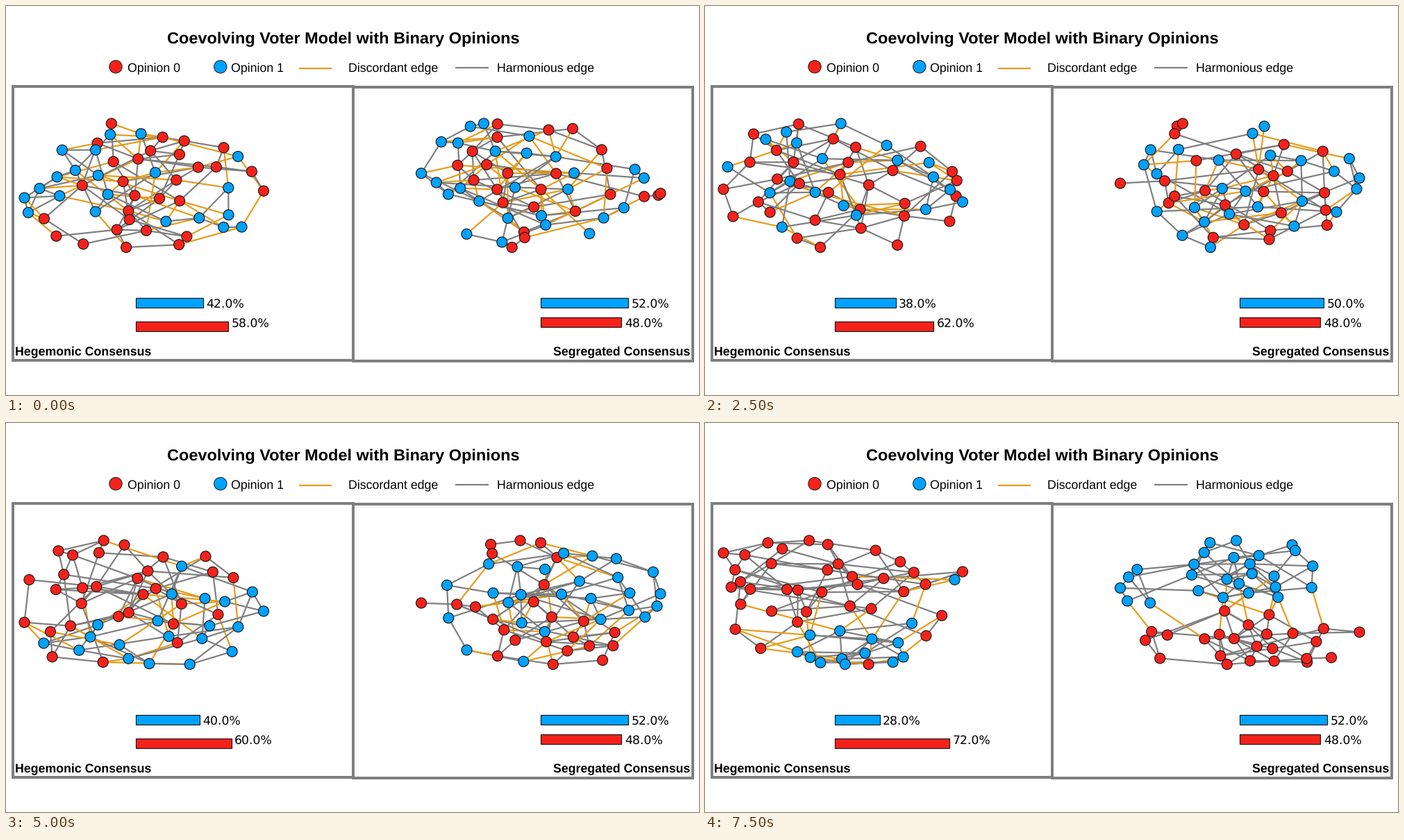
Animation of 998x561 px, one loop 8000 ms. Source, as a matplotlib script:

```python
import numpy as np
import matplotlib.pyplot as plt
from matplotlib.animation import FuncAnimation
from matplotlib.collections import LineCollection
from matplotlib.patches import Circle, Rectangle

W, H, DPI = 998, 561, 100
PT = 72 / DPI
N, EDGES, STEPS = 50, 110, 16
TOP, BOTTOM = 169.5, 348
RED, BLUE = "#f5221b", "#00a2ff"
ORANGE, GRAY, INK = "#e69c1c", "#7f7f7f", "#1c1c1c"

plt.rcParams["text.hinting"] = "none"
fig = plt.figure(figsize=(W / DPI, H / DPI), dpi=DPI, facecolor="white")
ax = fig.add_axes([0, 0, 1, 1])
ax.set(xlim=(0, W), ylim=(H, 0))
ax.axis("off")


def label(x, y, text, px, font="Liberation Sans", **kw):
    return ax.text(x, y, text, fontsize=px * PT, family=font, color="black",
                   va="baseline", **kw)


def trend(*keys):
    """Value at every step, linear between (step, value) keys."""
    return np.interp(np.arange(STEPS), *zip(*keys))


def even(values):
    return 2 * np.round(values / 2).astype(int)


def random_graph(rng):
    """A closed ring through all voters plus random shortcuts."""
    ring = rng.permutation(N).tolist()
    links = {tuple(sorted(p)) for p in zip(ring, ring[1:] + ring[:1])}
    while len(links) < EDGES:
        a, b = sorted(rng.integers(N, size=2).tolist())
        if a != b:
            links.add((a, b))
    return sorted(links)


def rewire(edges, blue, goal, rng):
    """Replace discordant edges by like-minded ones until `goal` remain."""
    edges = list(edges)
    while True:
        bad = [i for i, (a, b) in enumerate(edges) if blue[a] != blue[b]]
        if len(bad) <= goal:
            return edges
        i = bad[rng.integers(len(bad))]
        a, b = edges[i] if rng.random() < 0.5 else edges[i][::-1]
        if sum(b in e for e in edges) == 1:
            a, b = b, a
        c = int(rng.choice(np.flatnonzero(blue == blue[a])))
        new = (min(a, c), max(a, c))
        if a != c and new not in edges:
            edges[i] = new


def spring_layout(edges, rng, rounds=60):
    """Fruchterman-Reingold with a weak pull to the middle."""
    adj = np.zeros((N, N))
    for a, b in edges:
        adj[a, b] = adj[b, a] = 1
    k = 1 / np.sqrt(N)
    pos = rng.random((N, 2)) - 0.5
    for heat in np.linspace(0.1, 0.002, rounds):
        gap = pos[:, None] - pos[None]
        dist = np.maximum(np.hypot(gap[..., 0], gap[..., 1]), 0.01)
        pull = k * k / dist**2 - adj * dist / k
        move = (gap * pull[..., None]).sum(1) - 0.8 * pos
        size = np.maximum(np.hypot(*move.T), 0.01)
        pos += move * (heat / size)[:, None]
    return pos - pos.mean(0)


def fill_disc(pos):
    """Spread the radii evenly so the layout has a round outline."""
    r = np.hypot(*pos.T)
    rank = r.argsort().argsort()
    return pos * (((rank + 1) / N) ** 0.55 / r)[:, None]


def orient(pos, blue, degrees):
    """Turn the layout so the blue side faces the given direction."""
    dx, dy = pos[blue].mean(0) - pos[~blue].mean(0)
    t = np.radians(degrees) - np.arctan2(dy, dx)
    c, s = np.cos(t), np.sin(t)
    return pos @ np.array([[c, s], [-s, c]])


def fit(pos, left, right):
    unit = (pos - pos.min(0)) / np.ptp(pos, axis=0)
    return np.column_stack([left + unit[:, 0] * (right - left),
                            BOTTOM - unit[:, 1] * (BOTTOM - TOP)])


class Network:
    """One voter network with its two opinion bars."""

    def __init__(self, seed, blue_share, red_share, discord, facing, span,
                 bar_x, scale, red_y, pad):
        rng = np.random.default_rng(seed)
        rank = rng.permutation(N)
        edges = random_graph(rng)
        self.steps = []
        for share, part, angle in zip(blue_share, discord, facing):
            blue = rank < share // 2
            edges = rewire(edges, blue, part * EDGES, rng)
            pos = fill_disc(spring_layout(edges, rng))
            self.steps.append((fit(orient(pos, blue, angle), *span), blue, edges))

        self.shares = list(zip(blue_share, red_share))
        self.x, self.scale, self.pad = bar_x, scale, pad
        self.lines = ax.add_collection(
            LineCollection([], linewidths=2.2 * PT, zorder=2))
        self.dots = ax.scatter(np.zeros(N), np.zeros(N), s=(15 * PT) ** 2,
                               edgecolors=INK, linewidths=1.2 * PT, zorder=3)
        self.bars, self.texts = [], []
        for color, y, base in ((BLUE, 420.5, 435), (RED, red_y, 463)):
            bar = Rectangle((bar_x, y), 1, 14.5, fc=color, ec=INK, lw=1.2 * PT)
            self.bars.append(ax.add_patch(bar))
            self.texts.append(label(0, base, "", 17.3, "DejaVu Sans"))

    def show(self, i):
        pos, blue, edges = self.steps[i]
        self.lines.set_segments([pos[[a, b]] for a, b in edges])
        self.lines.set_color([GRAY if blue[a] == blue[b] else ORANGE
                              for a, b in edges])
        self.dots.set_offsets(pos)
        self.dots.set_facecolor([BLUE if b else RED for b in blue])
        for bar, text, share in zip(self.bars, self.texts, self.shares[i]):
            bar.set_width(share * self.scale)
            text.set_x(self.x + share * self.scale + self.pad)
            text.set_text(f"{share:.1f}%")


# Heading and legend
label(232, 54, "Coevolving Voter Model with Binary Opinions", 23.5, weight="bold")
for x, text_x, color, name in ((158, 175.5, RED, "Opinion 0"),
                               (308.8, 324.4, BLUE, "Opinion 1")):
    ax.add_patch(Circle((x, 87.6), 9.2, fc=color, ec=INK, lw=PT))
    label(text_x, 94, name, 17.8)
for x0, x1, y, color, text_x, name in (
        (422, 469, 90, ORANGE, 492.6, "Discordant edge"),
        (647, 695, 89, GRAY, 706.6, "Harmonious edge")):
    ax.plot([x0, x1], [y, y], color=color, lw=2.2 * PT, solid_capstyle="butt")
    label(text_x, 94.5, name, 17.8)

# Panels
for x, y, w in ((10, 116, 490), (500, 117, 489)):
    ax.add_patch(Rectangle((x, y), w, 395, fill=False, ec=GRAY, lw=4 * PT))
label(13.3, 503.3, "Hegemonic Consensus", 17.8, weight="bold")
label(985.5, 503.3, "Segregated Consensus", 17.8, weight="bold", ha="right")

left_blue = even(trend((0, 42), (5, 38), (7, 30), (9, 40), (11, 38), (15, 28)))
right_blue = even(trend((0, 52), (2, 52), (3, 56), (5, 50), (9, 50),
                        (11, 54), (14, 54), (15, 52)))
step = np.arange(STEPS)
undecided = np.where((step >= 3) & (step < 9), 2, 0)

networks = [
    Network(seed=4, blue_share=left_blue, red_share=100 - left_blue,
            discord=trend((0, 0.37), (15, 0.18)),
            facing=trend((0, 170), (3, -20), (7, 160), (11, -120), (15, -75)),
            span=(26.5, 371), bar_x=187.5, scale=2.29, red_y=454.5, pad=4),
    Network(seed=11, blue_share=right_blue, red_share=100 - right_blue - undecided,
            discord=trend((0, 0.4), (9, 0.32), (15, 0.11)),
            facing=trend((0, -170), (5, 0), (15, 100)),
            span=(598, 942.5), bar_x=770, scale=2.425, red_y=448.5, pad=4.8),
]


def update(i):
    for net in networks:
        net.show(i)
    return []


anim = FuncAnimation(fig, update, frames=STEPS, init_func=lambda: update(0),
                     interval=500, repeat=True, repeat_delay=0, blit=False)
plt.show()
```
